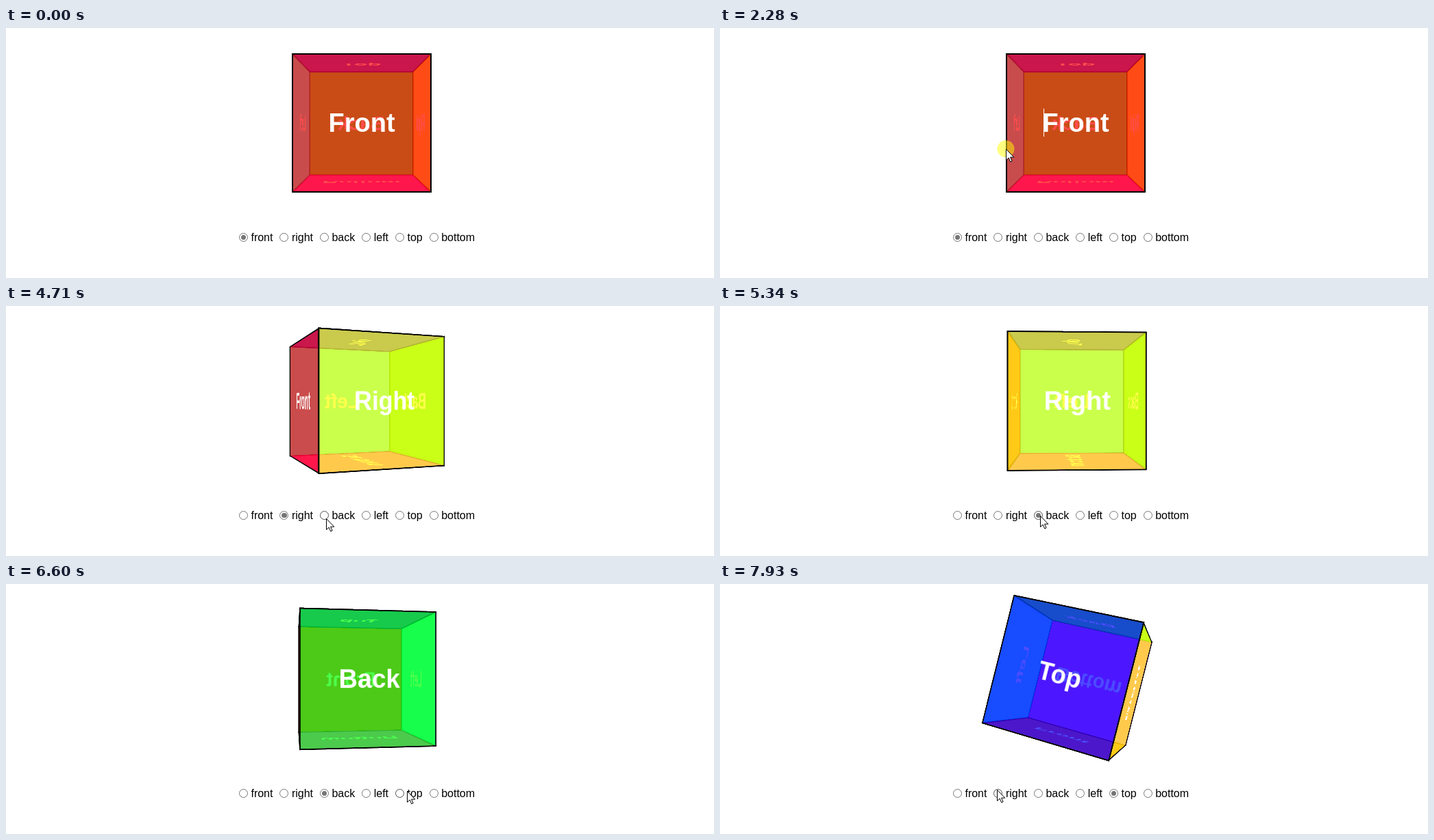
These frames come from a looping animation (1033x366 px, 8 s). An HTML page with a canvas:

```html
<!DOCTYPE html>
<html lang="en">
<head>
<meta charset="utf-8">
<title>Cube</title>
<style>
  html, body { margin: 0; width: 100%; height: 100%; overflow: hidden; background: #fff; }
  body { position: relative; font: 16px/20px Arial, "Liberation Sans", sans-serif; color: #000; }
  .scene { position: absolute; left: 417px; top: 37px; width: 200px; height: 210px; perspective: 600px; }
  .cube { position: relative; width: 200px; height: 200px; transform-style: preserve-3d; }
  .face {
    position: absolute; width: 200px; height: 200px; border: 2px solid #000;
    font-size: 38px; font-weight: bold; line-height: 200px; text-align: center; color: #fff;
  }
  .options { position: absolute; left: 340px; top: 297px; display: flex; white-space: nowrap; }
  .option { position: relative; padding-left: 17.45px; margin-right: 10px; }
  .option i {
    position: absolute; left: 0; top: 3px; width: 11px; height: 11px;
    border: 1px solid #767676; border-radius: 50%;
  }
  .option.hover i { border-color: #4f4f4f; }
  .option.on i::after {
    content: ""; position: absolute; inset: 1.6px; border-radius: 50%; background: #767676;
  }
  canvas { position: absolute; left: 0; top: 0; }
</style>
</head>
<body>
<div class="scene"><div class="cube"></div></div>
<div class="options"></div>
<canvas width="1033" height="366"></canvas>
<script>
const LOOP = 8000, TURN = 2100;
const cube = document.querySelector('.cube');
const options = document.querySelector('.options');
const ctx = document.querySelector('canvas').getContext('2d');

const faces = [
  ['Front', 'rotateY(0deg)'], ['Right', 'rotateY(90deg)'], ['Back', 'rotateY(180deg)'],
  ['Left', 'rotateY(-90deg)'], ['Top', 'rotateX(90deg)'], ['Bottom', 'rotateX(-90deg)']
];
const labels = faces.map(([name, turn], i) => {
  const face = document.createElement('div');
  face.className = 'face';
  face.textContent = name;
  face.style.background = `hsla(${i * 60}, 100%, 50%, 0.7)`;
  face.style.transform = `${turn} translateZ(100px)`;
  cube.append(face);

  const label = document.createElement('span');
  label.className = 'option';
  label.append(document.createElement('i'), name.toLowerCase());
  options.append(label);
  return label;
});

// Quaternions as [x, y, z, w]
const H = Math.SQRT1_2;
const clicks = [
  { at: 3731, option: 1, q: [0, -H, 0, H] },
  { at: 5280, option: 2, q: [0, -1, 0, 0] },
  { at: 6670, option: 4, q: [-H, 0, 0, H] }
];

// Pointer stops: time, x, y
const path = [
  [200, 945, 332], [970, 553, 145], [1530, 420, 305], [1810, 414, 303],
  [1940, 417, 177], [2290, 417, 177], [2620, 420, 319], [3100, 415, 321],
  [3460, 412, 316], [3660, 405, 299], [3860, 406, 301], [4710, 467, 311],
  [5200, 466, 308], [5320, 466, 307], [5830, 600, 307], [6300, 588, 303],
  [6730, 584, 303], [7230, 495, 305], [7930, 404, 301]
];
const CARET = 1950, BLINK = 530;

// The CSS "ease" curve
function ease(x) {
  if (x <= 0) return 0;
  if (x >= 1) return 1;
  const bez = (u, a, b) => 3 * u * (1 - u) * ((1 - u) * a + u * b) + u ** 3;
  let lo = 0, hi = 1;
  for (let i = 0; i < 30; i++) {
    const mid = (lo + hi) / 2;
    if (bez(mid, .25, .25) < x) lo = mid; else hi = mid;
  }
  return bez(lo, .1, 1);
}

function slerp(a, b, k) {
  const dot = a.reduce((s, v, i) => s + v * b[i], 0);
  const angle = Math.acos(Math.min(1, dot));
  if (angle < 1e-6) return b;
  const ka = Math.sin((1 - k) * angle) / Math.sin(angle);
  const kb = Math.sin(k * angle) / Math.sin(angle);
  return a.map((v, i) => v * ka + b[i] * kb);
}

// Each click starts from wherever the unfinished turn has got to
function pose(t) {
  let q = [0, 0, 0, 1];
  clicks.forEach((c, i) => {
    if (t < c.at) return;
    const end = i + 1 < clicks.length ? Math.min(t, clicks[i + 1].at) : t;
    q = slerp(q, c.q, ease((end - c.at) / TURN));
  });
  return q;
}

function pointer(t) {
  const i = path.findIndex(p => p[0] > t);
  if (i < 0) return path[path.length - 1].slice(1);
  const [t0, x0, y0] = path[i - 1], [t1, x1, y1] = path[i];
  const k = (t - t0) / (t1 - t0), s = k * k * (3 - 2 * k);
  return [x0 + (x1 - x0) * s, y0 + (y1 - y0) * s];
}

function drawArrow(x, y) {
  const shape = [[0, 0], [0, 16], [3.7, 12.6], [6.2, 18.4], [8.6, 17.4], [6.1, 11.7], [11.3, 11.7]];
  ctx.beginPath();
  shape.forEach(([dx, dy]) => ctx.lineTo(x + dx + .5, y + dy + .5));
  ctx.closePath();
  ctx.fillStyle = '#fff';
  ctx.fill();
  ctx.strokeStyle = '#000';
  ctx.lineWidth = 1;
  ctx.stroke();
}

function drawBeam(x, y) {
  ctx.fillStyle = '#000';
  ctx.fillRect(x, y - 8, 1, 17);
  ctx.fillRect(x - 3, y - 9, 7, 1);
  ctx.fillRect(x - 3, y + 9, 7, 1);
}

function drawPointer(t) {
  const [x, y] = pointer(t).map(Math.round);
  if (x > 470 && x < 567 && y > 117 && y < 161) return drawBeam(x, y);
  if (t < clicks[0].at) {
    ctx.fillStyle = 'rgba(255, 255, 0, 0.5)';
    ctx.beginPath();
    ctx.arc(x, y, 12.5, 0, Math.PI * 2);
    ctx.fill();
  }
  drawArrow(x, y);
}

function render(t) {
  const [x, y, z, w] = pose(t);
  const axis = [x, y, z].map(v => v.toFixed(6)).join(', ');
  const angle = 2 * Math.acos(Math.max(-1, Math.min(1, w)));
  cube.style.transform = `translateZ(-100px) rotate3d(${axis}, ${angle.toFixed(6)}rad)`;

  const shown = t >= path[0][0];
  const [px, py] = shown ? pointer(t) : [-1, -1];
  const picked = clicks.reduce((n, c) => t >= c.at ? c.option : n, 0);
  labels.forEach((label, i) => {
    const left = 340 + label.offsetLeft;
    const over = px >= left && px < left + label.offsetWidth && py >= 297 && py < 317;
    label.classList.toggle('on', i === picked);
    label.classList.toggle('hover', over);
  });

  ctx.clearRect(0, 0, 1033, 366);
  if (t >= CARET && t < clicks[0].at && Math.floor((t - CARET) / BLINK) % 2 === 0) {
    ctx.fillStyle = '#fff';
    ctx.fillRect(472, 118, 1, 41);
  }
  if (shown) drawPointer(t);
}

const start = performance.now();
function tick() {
  render((performance.now() - start) % LOOP);
  requestAnimationFrame(tick);
}
tick();
</script>
</body>
</html>
```
